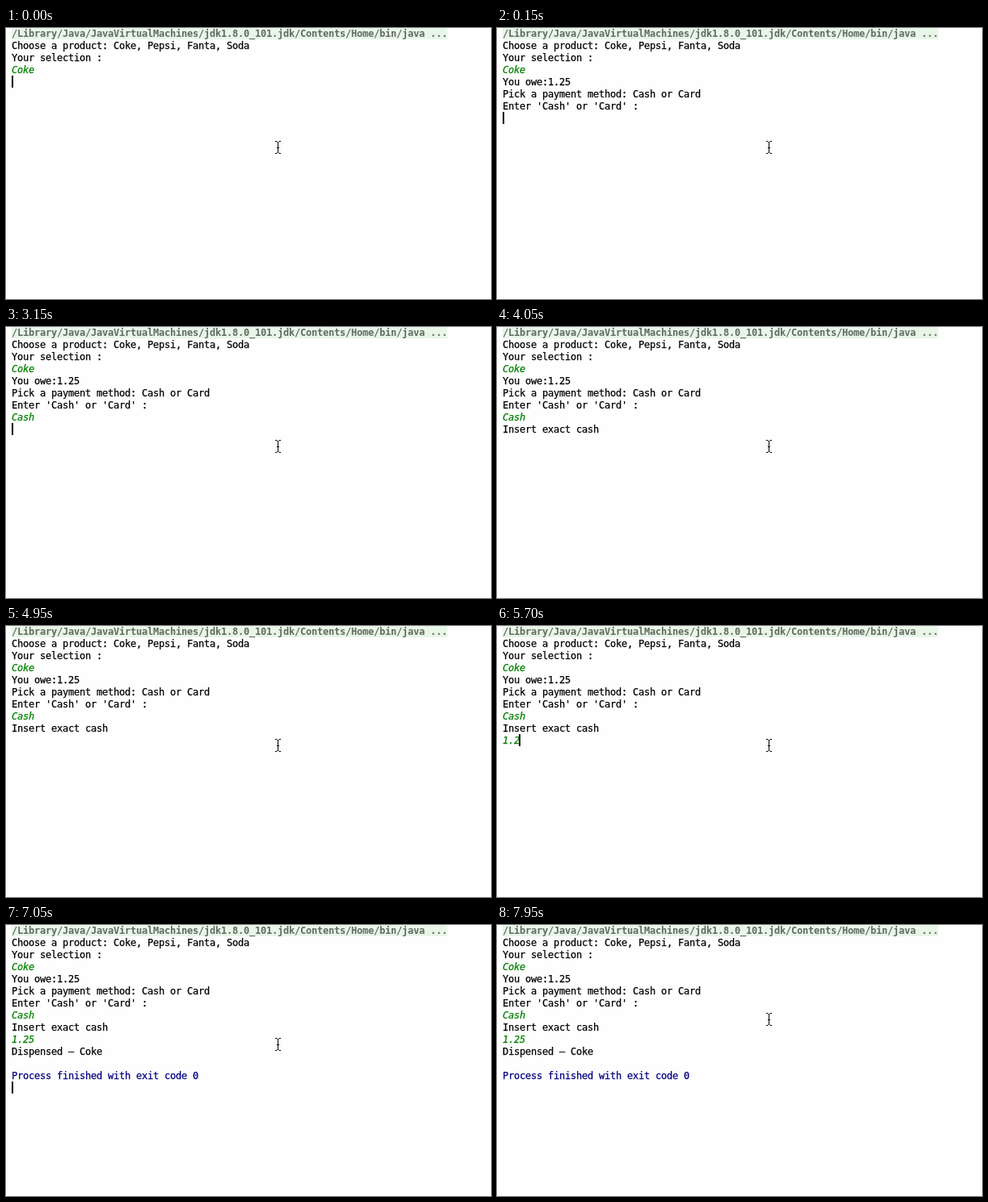
An HTML page that plays this animation: 600x336 px, repeating every 8 s.

```html
<!DOCTYPE html>
<html lang="en">
<head>
<meta charset="utf-8">
<title>Vending machine console</title>
<style>
  html, body { margin: 0; width: 100%; height: 100%; overflow: hidden; background: #fefefe; }
  svg { display: block; width: 600px; height: 336px; }
  /* every character takes a 7px console cell; the thin stroke gives a heavier face */
  text {
    font: 12px "DejaVu Sans Mono", monospace; letter-spacing: calc(7px - 1ch);
    fill: currentColor; stroke: currentColor; stroke-width: .25px; color: #000;
  }
  .command { font-weight: bold; color: #626a62; stroke: none; }
  .input { font-style: italic; color: #007f00; }
  .exit { color: #00007f; }
</style>
</head>
<body>
<svg viewBox="0 0 600 336">
  <rect x="7" width="539" height="14" fill="#e8f6e8"/>
  <g id="screen"></g>
  <rect id="caret" width="2" height="15"/>
  <path id="mouse" fill="none" stroke="#000"
    d="M333 140.5h2l1.5 1.5 1.5-1.5h2M336.5 142v12M333 155.5h2l1.5-1.5 1.5 1.5h2M335 148.5h3"/>
</svg>
<script>
const LOOP = 8000, TICK = 150, ROW = 15, CELL = 7, LEFT = 7;
const BLINK = 1000, HOLD = 400;

// everything written to the console: time, text, style
const session = [
  [0, "/Library/Java/JavaVirtualMachines/jdk1.8.0_101.jdk/Contents/Home/bin/java ...\n", "command"],
  [0, "Choose a product: Coke, Pepsi, Fanta, Soda\nYour selection :\n"],
  [0, "Coke\n", "input"],
  [150, "You owe:1.25\nPick a payment method: Cash or Card\nEnter 'Cash' or 'Card' :\n"],
  [1800, "C", "input"],
  [2250, "as", "input"],
  [2400, "h", "input"],
  [3150, "\n"],
  [3450, "Insert exact cash\n"],
  [5250, "1", "input"],
  [5400, ".", "input"],
  [5700, "2", "input"],
  [6150, "5", "input"],
  [6450, "\n"],
  [6750, "Dispensed – Coke\n"],
  [7050, "\nProcess finished with exit code 0\n", "exit"],
];

const [screen, caret, mouse] =
  ["screen", "caret", "mouse"].map(id => document.getElementById(id));

function addText(row, col, text, style) {
  const node = document.createElementNS("http://www.w3.org/2000/svg", "text");
  node.setAttribute("x", LEFT + col * CELL);
  node.setAttribute("y", row * ROW + 11);
  node.setAttribute("class", style);
  node.textContent = text;
  return screen.appendChild(node);
}

// lay the session out once; each write remembers where it leaves the caret
let row = 0, col = 0;
const writes = session.map(([time, text, style = ""]) => {
  const nodes = text.split("\n").map((line, i) => {
    if (i) { row++; col = 0; }
    const node = addText(row, col, line, style);
    col += line.length;
    return node;
  });
  return { time, nodes, row, col };
});

function draw(t) {
  t -= t % TICK;
  for (const { time, nodes } of writes)
    for (const node of nodes) node.style.display = time <= t ? "" : "none";

  // the caret blinks steadily but stays lit just after each write
  const last = writes.findLast(write => write.time <= t);
  const lit = t - last.time < HOLD || (t + 60) % BLINK >= BLINK / 2;
  caret.style.display = lit ? "" : "none";
  caret.setAttribute("x", Math.max(LEFT, LEFT - 1 + last.col * CELL));
  caret.setAttribute("y", last.row * ROW - 1);

  mouse.setAttribute("transform", `translate(0 ${t < 7950 ? 0 : -31})`);
}

let begin;
function tick(now) {
  begin ??= now;
  draw((now - begin) % LOOP);
  requestAnimationFrame(tick);
}
draw(0);
requestAnimationFrame(tick);
</script>
</body>
</html>
```
